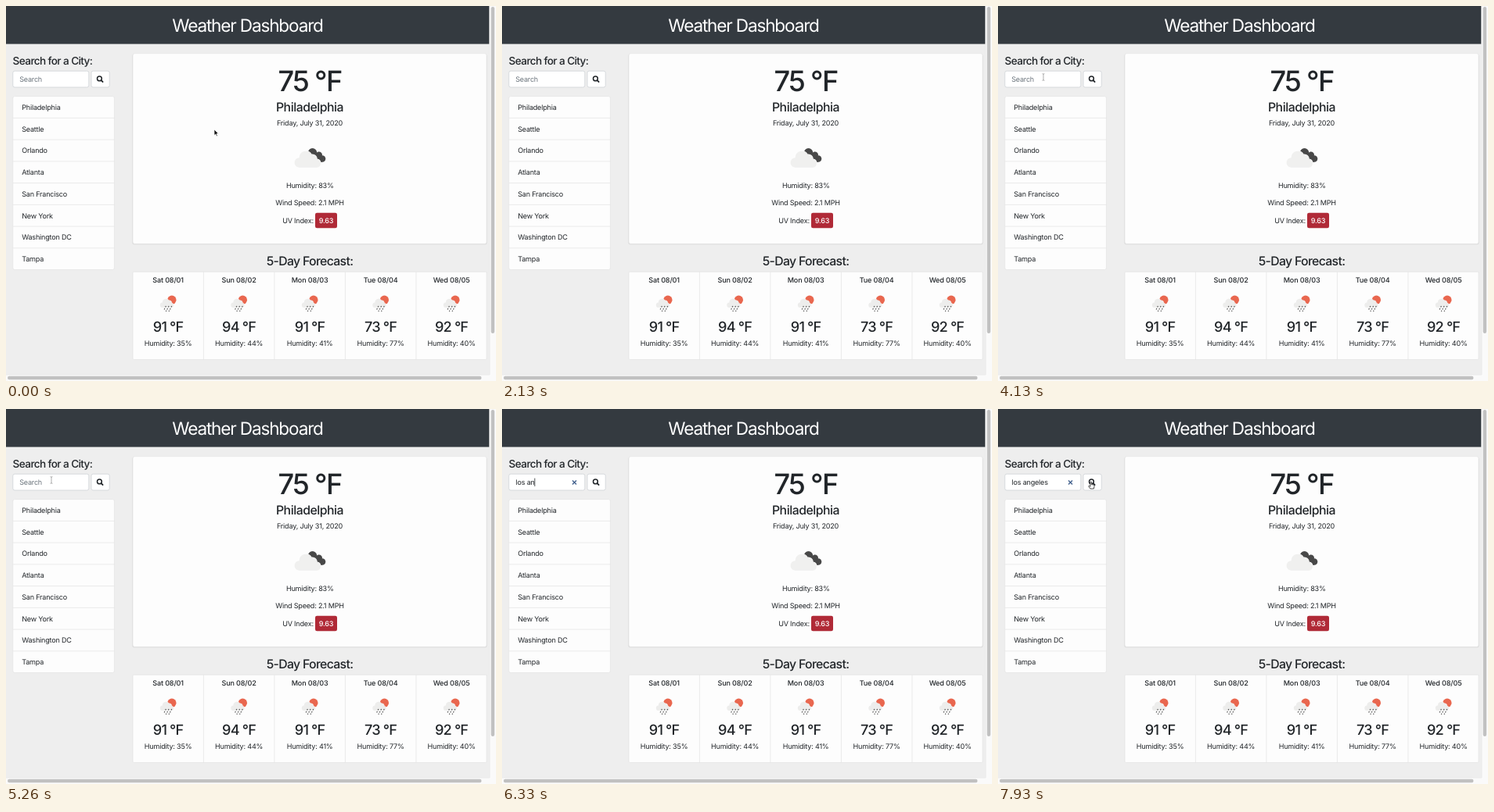
An HTML page that plays this animation: 626 px wide and 480 px high, repeating every 8 s.

```html
<!DOCTYPE html>
<html lang="en">
<head>
<meta charset="utf-8">
<title>Weather Dashboard</title>
<style>
  html, body { margin: 0; width: 100%; height: 100%; overflow: hidden; background: #eee; }
  svg { display: block; width: 626px; height: 480px; }
  text {
    font: 400 9.06px Inter, Roboto, sans-serif;
    font-optical-sizing: none;
    letter-spacing: -.022em;
    text-rendering: geometricPrecision;
    white-space: pre;
    fill: #212529;
  }
  .mid { text-anchor: middle; }
  .title { font-size: 22.6px; letter-spacing: -.052em; fill: #fff; }
  .huge { font-size: 36.2px; font-weight: 500; letter-spacing: -.048em; }
  .h2 { font-size: 18.1px; font-weight: 500; letter-spacing: -.045em; }
  .h3 { font-size: 15.8px; font-weight: 500; letter-spacing: -.042em; }
  .city { letter-spacing: -.03em; }
  .h4 { font-size: 13.6px; font-weight: 500; letter-spacing: -.045em; }
  .day { font-weight: 500; letter-spacing: -.015em; }
  .badge { font-weight: 500; fill: #fff; }
  .hint { fill: #6c757d; }
  .box { fill: #fdfdfd; stroke: #dfdfdf; stroke-width: .6; }
  .field { fill: #fff; stroke: #ced2d6; stroke-width: .8; }
  .shade { fill: #000; opacity: .07; }
  .rule { fill: none; stroke: #e2e2e2; stroke-width: .7; }
  .thumb { fill: #c1c1c1; }
</style>
</head>
<body>
<svg viewBox="0 0 626 480" xmlns="http://www.w3.org/2000/svg">
  <defs>
    <g id="cloudy">
      <g fill="#484848">
        <circle cx="391.5" cy="187.7" r="5.7"/>
        <circle cx="399.8" cy="190.6" r="4.2"/>
        <circle cx="404" cy="195.5" r="4.3"/>
        <path d="M388 188H400L404 199.8H392Z"/>
      </g>
      <path d="M375 206.8A6.3 6.3 0 0 1 374.6 194.2A8.3 8.3 0 0 1 390.3 190.2A6 6 0 0 1 397.3 196.2A5.4 5.4 0 0 1 397.8 206.8Z"
            fill="#f0f0ef" stroke="#fdfdfd" stroke-width="1.2" paint-order="stroke"/>
    </g>
    <g id="rainy">
      <circle cx="4.8" cy="-4.8" r="5.6" fill="#e9674f"/>
      <path d="M-7 5A3.2 3.2 0 0 1 -7.2-1.4A4.5 4.5 0 0 1 1-4.2A3.8 3.8 0 0 1 4.8-.8A3 3 0 0 1 4.8 5Z"
            fill="#ededec" stroke="#fdfdfd" stroke-width=".8" paint-order="stroke"/>
      <path d="M-2.7 3l-.8 1.6M1 3l-.8 1.6M4.7 3l-.8 1.6M-4.2 6l-.8 1.6M-.6 6l-.8 1.6M3.1 6l-.8 1.6M-2.2 8.8l-.6 1.2M1.5 8.8l-.6 1.2"
            stroke="#505050" stroke-width="1.1" fill="none"/>
    </g>
  </defs>

  <rect width="626" height="480" fill="#eee"/>
  <rect width="617.6" height="48.6" fill="#343a40"/>
  <g id="page"></g>

  <g id="search">
    <rect class="field" x="8.8" y="83.2" width="97" height="20.8" rx="2.3"/>
    <rect class="field" x="109" y="83.2" width="23.2" height="20.8" rx="2.3"/>
    <g fill="none" stroke="#212529" stroke-width="1.5">
      <circle cx="119.4" cy="92.9" r="2.9"/>
      <path d="M121.6 95.1L124.1 97.6" stroke-width="1.8"/>
    </g>
    <text id="hint" class="hint" x="17.2" y="96.8">Search</text>
    <text id="typed" x="17.5" y="96.8"></text>
    <rect id="caret" y="88.6" width=".8" height="10.4" fill="#212529"/>
    <path id="clear" d="M90 91.5l5 5m0-5l-5 5" stroke="#41608c" stroke-width="1.4"/>
  </g>

  <rect x="617.6" width="8.4" height="480" fill="#fafafa"/>
  <rect y="471.8" width="626" height="8.2" fill="#fafafa"/>
  <path class="rule" d="M617.9 0V472H0"/>
  <rect class="thumb" x="619.7" y="1" width="4.4" height="418" rx="2.2"/>
  <rect class="thumb" x="2" y="473.8" width="605.5" height="4.4" rx="2.2"/>

  <g id="arrow">
    <path d="M0 0V7.6L1.8 6L3 8.8L4.3 8.2L3.1 5.5H5.4Z" fill="#111" stroke="#fff" stroke-width=".7"/>
  </g>
  <g id="beam">
    <path d="M-1.4-4.4Q0-4.4 0-3.4Q0-4.4 1.4-4.4M0-3.4V3.4M-1.4 4.4Q0 4.4 0 3.4Q0 4.4 1.4 4.4"
          fill="none" stroke="#8a8a8a" stroke-width=".7"/>
  </g>
  <g id="hand">
    <path d="M-.8 1Q-.8 0 0 0T.8 1V3.6L3.4 4.1Q4.4 4.4 4.3 5.4L3.6 9H-.9L-3 6.2Q-3.3 5.2-2.2 5.3L-.8 6.3Z"
          fill="#fff" stroke="#222" stroke-width=".8"/>
  </g>
</svg>
<script>
const LOOP = 8000;
const $ = id => document.getElementById(id);
const page = $('page');

function add(tag, attrs, content = '') {
  const el = document.createElementNS('http://www.w3.org/2000/svg', tag);
  for (const key in attrs) el.setAttribute(key, attrs[key]);
  el.textContent = content;
  return page.appendChild(el);
}
const label = (x, y, content, cls = '') => add('text', { x, y, class: cls }, content);
const rect = (x, y, width, height, cls, rx = 2.3) => add('rect', { x, y, width, height, rx, class: cls });
const line = d => add('path', { d, class: 'rule' });

function buildPage() {
  label(308.5, 33, 'Weather Dashboard', 'mid title');
  label(8.6, 75.1, 'Search for a City:', 'h4');

  rect(8.8, 115.6, 129.6, 222, 'box');
  ['Philadelphia', 'Seattle', 'Orlando', 'Atlanta', 'San Francisco', 'New York', 'Washington DC', 'Tampa']
    .forEach((city, i) => {
      const top = 115.6 + i * 27.75;
      if (i) line(`M8.8 ${top}H138.4`);
      label(20.2, top + 17.3, city);
    });

  rect(161.4, 61.6, 453.2, 244, 'shade');
  rect(162, 60.8, 452, 243.6, 'box');
  label(388, 108.8, '75 °F', 'mid huge');
  label(388, 135.3, 'Philadelphia', 'mid h3 city');
  label(388, 153.3, 'Friday, July 31, 2020', 'mid');
  add('use', { href: '#cloudy' });
  label(388.3, 232.8, 'Humidity: 83%', 'mid');
  label(388, 255.3, 'Wind Speed: 2.1 MPH', 'mid');
  label(353.2, 277.8, 'UV Index:');
  add('rect', { x: 395, y: 264.8, width: 28, height: 19.4, rx: 2.3, fill: '#b02a37' });
  label(409, 277.8, '9.63', 'mid badge');

  label(388, 331.8, '5-Day Forecast:', 'mid h3');
  rect(162, 340.2, 452, 112.4, 'box', 1.5);
  [['Sat', 91, 35], ['Sun', 94, 44], ['Mon', 91, 41], ['Tue', 73, 77], ['Wed', 92, 40]]
    .forEach(([day, temp, wet], i) => {
      const x = 207.1 + i * 90.5;
      if (i) line(`M${x - 45.2} 340.2V452.6`);
      label(x, 354.3, `${day} 08/0${i + 1}`, 'mid day');
      add('use', { href: '#rainy', x, y: 381 });
      label(x, 417.2, `${temp} °F`, 'mid h2');
      label(x, 434.8, `Humidity: ${wet}%`, 'mid');
    });
}

// Pointer: time, shape, x, y
const pointer = [
  [0, 'arrow', 266, 158],
  [60, 'arrow', 264, 158],
  [130, 'arrow', 262, 158],
  [200, ''],
  [3660, 'arrow', 90, 127],
  [3730, 'arrow', 86, 122],
  [3800, 'arrow', 80, 115],
  [3860, 'arrow', 74, 108],
  [3930, 'beam', 68, 101],
  [4000, 'beam', 63, 96],
  [4060, 'beam', 60, 93],
  [4130, 'beam', 58, 91],
  [5860, ''],
  [7600, 'beam', 62, 91],
  [7660, 'beam', 78, 92],
  [7730, 'beam', 98, 93],
  [7860, 'hand', 114, 93],
  [7930, 'hand', 118.8, 93]
];
const query = 'los angeles';
const keyTimes = [5530, 5800, 6000, 6130, 6200, 6330, 6530, 6600, 6800, 6860, 7060];
const caretShown = t => (t >= 4730 && t < 5260) || (t >= 5530 && t < 7600);

function draw(t) {
  const count = keyTimes.filter(k => k <= t).length;
  const typed = $('typed');
  typed.textContent = query.slice(0, count);
  $('hint').style.display = count ? 'none' : '';
  $('clear').style.display = count ? '' : 'none';

  const caret = $('caret');
  caret.style.display = caretShown(t) ? '' : 'none';
  caret.setAttribute('x', 17.3 + (count ? typed.getComputedTextLength() : 0));

  const [, shape, x, y] = pointer.filter(p => p[0] <= t).pop();
  for (const id of ['arrow', 'beam', 'hand']) {
    $(id).style.display = id === shape ? '' : 'none';
    if (id === shape) $(id).setAttribute('transform', `translate(${x} ${y})`);
  }
}

buildPage();
const start = performance.now();
function tick() {
  draw((performance.now() - start) % LOOP);
  requestAnimationFrame(tick);
}
tick();
</script>
</body>
</html>
```
